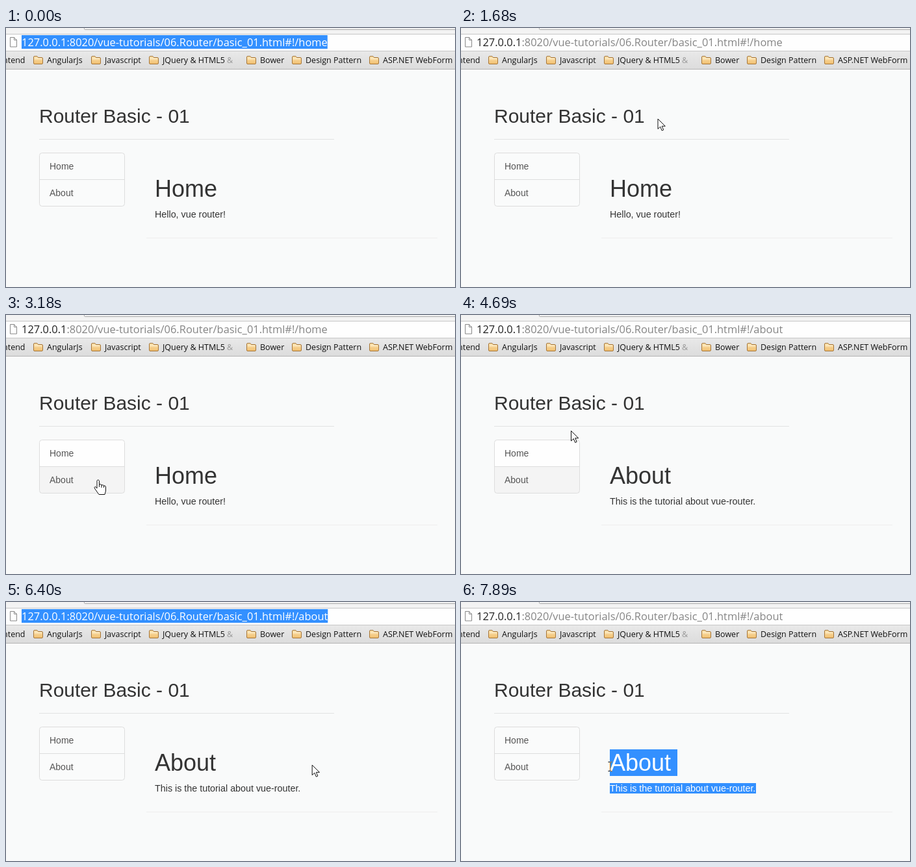
Recreate the animation shown at these times as an HTML page. Size 691 by 399 pixels, loop 8 s.

```html
<!DOCTYPE html>
<html lang="en">
<meta charset="utf-8">
<title>Router Basic - 01</title>
<style>
  html, body { margin: 0; width: 100%; height: 100%; overflow: hidden; background: #f9fafa; }
  svg { display: block; }
  text { white-space: pre; }
  #url { font: 16.42px "Open Sans", sans-serif; fill: var(--ink, #858585); }
  #url .host { fill: var(--ink, #222); }
  #bookmarks { font: 12.5px "Open Sans", sans-serif; fill: #111; }
  #page { font: 14px "Liberation Sans", Arial, sans-serif; fill: #555; }
  #title { font-size: 30px; fill: #333; }
  #head { font: 36px "Liberation Sans", Arial, sans-serif; fill: var(--ink, #333); }
  #para { font: 14.32px "Liberation Sans", Arial, sans-serif; fill: var(--ink, #333); }
  #selection { --ink: #fff; }
  .pointer { fill: #fff; stroke: #111; stroke-linejoin: round; }
  #ibeam { fill: none; stroke: #fff; mix-blend-mode: difference; }
</style>
<svg width="691" height="399" viewBox="0 0 691 399">
  <defs>
    <linearGradient id="bar" x2="0" y2="1">
      <stop stop-color="#e9e9e9"/><stop offset="1" stop-color="#dcdcdc"/>
    </linearGradient>
    <linearGradient id="manila" x2="0" y2="1">
      <stop stop-color="#fde7b8"/><stop offset="1" stop-color="#f0bd6c"/>
    </linearGradient>
    <g id="folder" stroke="#a5763a">
      <path d="M.5 11V2q0-1.5 1.5-1.5h4l1.5 2H13q1.5 0 1.5 1.500v7q0 1.500-1.500 1.500H2Q.5 12.500.5 11Z" fill="url(#manila)"/>
      <path d="M2 4.500h11" stroke="#fff3d6"/>
    </g>
    <clipPath id="clip">
      <rect id="urlSel" y="11" height="21"/>
      <rect id="headSel" y="227" height="41"/>
      <rect id="paraSel" y="279" height="16"/>
    </clipPath>
  </defs>

  <rect width="691" height="399" fill="#f9fafa"/>
  <rect width="691" height="35" fill="#f3f3f3"/>
  <rect y="9" width="691" height="26" fill="#fefefe"/>
  <path d="M120.500 0v1.500q0 1 1 1H691" fill="none" stroke="#aaa"/>
  <path d="M0 9.500H691" stroke="#c6c6c6"/>
  <rect y="35" width="691" height="28" fill="url(#bar)"/>
  <path d="M0 35.500H691" stroke="#c6c6c6"/>
  <path d="M0 63.500H691" stroke="#b4b4b4"/>
  <path d="M6.500 14.500h6l4 4v10.500h-10ZM12.500 14.500v4h4" fill="#fff" stroke="#888"/>
  <text id="url" x="24" y="28"><tspan class="host">127.0.0.1</tspan>:8020/vue-tutorials/06.Router/basic_01.html#!/<tspan id="route">home</tspan></text>
  <g id="bookmarks">
    <text x="29.500" y="54" text-anchor="end">Frontend</text>
  </g>

  <g id="page">
    <text id="title" x="51" y="146">Router Basic - 01</text>
    <path d="M51 171.500H505" stroke="#e3e4e4"/>
    <path d="M216 323.500H664" stroke="#eee"/>
    <rect id="homeRow" x="52" y="193" width="130" height="40"/>
    <rect id="aboutRow" x="52" y="234" width="130" height="40"/>
    <rect x="51.500" y="192.500" width="131" height="82" rx="4" fill="none" stroke="#ddd"/>
    <path d="M51 233.500h132" stroke="#ddd"/>
    <text x="67" y="218">Home</text>
    <text x="67" y="259">About</text>
  </g>
  <text id="head" x="229" y="260">Home</text>
  <text id="para" x="229" y="292">Hello, vue router!</text>

  <g id="selection" clip-path="url(#clip)">
    <rect width="691" height="399" fill="#3390ff"/>
    <use href="#url"/><use href="#head"/><use href="#para"/>
  </g>

  <path id="arrow" class="pointer" d="M0 .5V16L3.700 12.500 6.200 18.500 8.700 17.400 6.200 11.700H11.300Z"/>
  <path id="hand" class="pointer" d="M-2 1.500a1.800 1.800 0 0 1 3.500 0V7q3-1 3.500 1 3-.8 3.500 1 3-.5 3 2V17L10 22.500H1L-5 14q-2-3 0-3.500 1.500 0 3 2.500ZM1.500 7v4M5 8v4M8.500 9v3"/>
  <path id="ibeam" d="M-3-7.500h2.500M.5-7.500H3M0-7V6M-3 6.500h2.500M.5 6.500H3"/>
</svg>
<script>
const LOOP = 8000, STEP = 140, TEXT_X = 229;
const $ = id => document.getElementById(id);

const bookmarks = {
  42: "AngularJs", 131: "Javascript", 220: 'JQuery &amp; HTML5 <tspan fill="#999">&amp;</tspan>',
  370: "Bower", 440: "Design Pattern", 559: "ASP.NET WebForm"
};
$("bookmarks").innerHTML += Object.entries(bookmarks).map(([x, label]) =>
  `<use href="#folder" x="${x}" y="43"/><text x="${+x + 21}" y="54">${label}</text>`).join("");

// Each move continues from where the previous one stopped
const moves = [
  { start: 150, end: 850, to: [452, 21] },
  { start: 850, end: 990, to: [505.5, 20.5] },
  { start: 1140, end: 2490, to: [161, 223] },
  { start: 2490, end: 3180, to: [142, 254] },
  { start: 4550, end: 4690, to: [169.5, 178] },
  { start: 4690, end: 5365, to: [541, 22] },
  { start: 5630, end: 6790, to: [457, 297] },
  { start: 6790, end: 6940, to: [419.5, 296] },
  { start: 6940, end: 7330, to: [258, 256] },
  { start: 7330, end: 7890, to: [229.5, 254] }
];

const within = (t, from, to) => t >= from && t < to;
const clamp01 = v => Math.min(1, Math.max(0, v));

// Progress from 0 to 1 in jumps of about one screen refresh
function stepped(t, start, end) {
  const n = Math.round((end - start) / STEP);
  return Math.floor(clamp01((t - start) / (end - start)) * n + 1e-6) / n;
}

function pointerAt(t) {
  let [x, y] = [552, 30];
  for (const { start, end, to } of moves) {
    const k = Math.sin(stepped(t, start, end) * Math.PI / 2);
    x += (to[0] - x) * k;
    y += (to[1] - y) * k;
  }
  return [x, y];
}

function pointerKind(t, x, y) {
  if (t < 150 || within(t, 5500, 5770)) return "none";
  if (y < 35 || t >= 6790) return "ibeam";
  return within(x, 51, 183) && within(y, 192, 275) ? "hand" : "arrow";
}

function span(id, visible, from, to) {
  $(id).setAttribute("x", from);
  $(id).setAttribute("width", visible ? Math.max(0, to - from) : 0);
}

function select(t, x, y) {
  const urlEnd = 24 + $("url").getComputedTextLength();
  const routeStart = urlEnd - $("route").getComputedTextLength();
  if (within(t, 850, 1400)) {
    span("urlSel", true, routeStart, routeStart + (urlEnd - routeStart) * stepped(t, 850, 1140));
  } else {
    span("urlSel", t < 500 || within(t, 5365, 6940), 24, urlEnd);
  }

  const dragging = t >= 6940 + STEP, inHeading = y < 274;
  span("headSel", dragging && inHeading, Math.max(TEXT_X, Math.floor(x)), 333);
  span("paraSel", dragging, inHeading ? TEXT_X : x, 454);
}

function setText(id, value) {
  if ($(id).textContent !== value) $(id).textContent = value;
}

function draw(t) {
  const about = t >= 3860, hovered = within(t, 2620, 4820);
  setText("route", about ? "about" : "home");
  setText("head", about ? "About" : "Home");
  setText("para", about ? "This is the tutorial about vue-router." : "Hello, vue router!");
  $("aboutRow").style.fill = hovered ? "#f4f4f4" : "#fafbfb";
  $("homeRow").style.fill = hovered ? "#fefefe" : "#fafbfb";

  const [x, y] = pointerAt(t);
  select(t, x, y);
  const kind = pointerKind(t, x, y);
  for (const id of ["arrow", "hand", "ibeam"]) {
    $(id).style.display = id === kind ? "" : "none";
    $(id).setAttribute("transform", `translate(${x} ${y})`);
  }
}

function tick() {
  draw(performance.now() % LOOP);
  requestAnimationFrame(tick);
}
tick();
</script>
</html>
```
